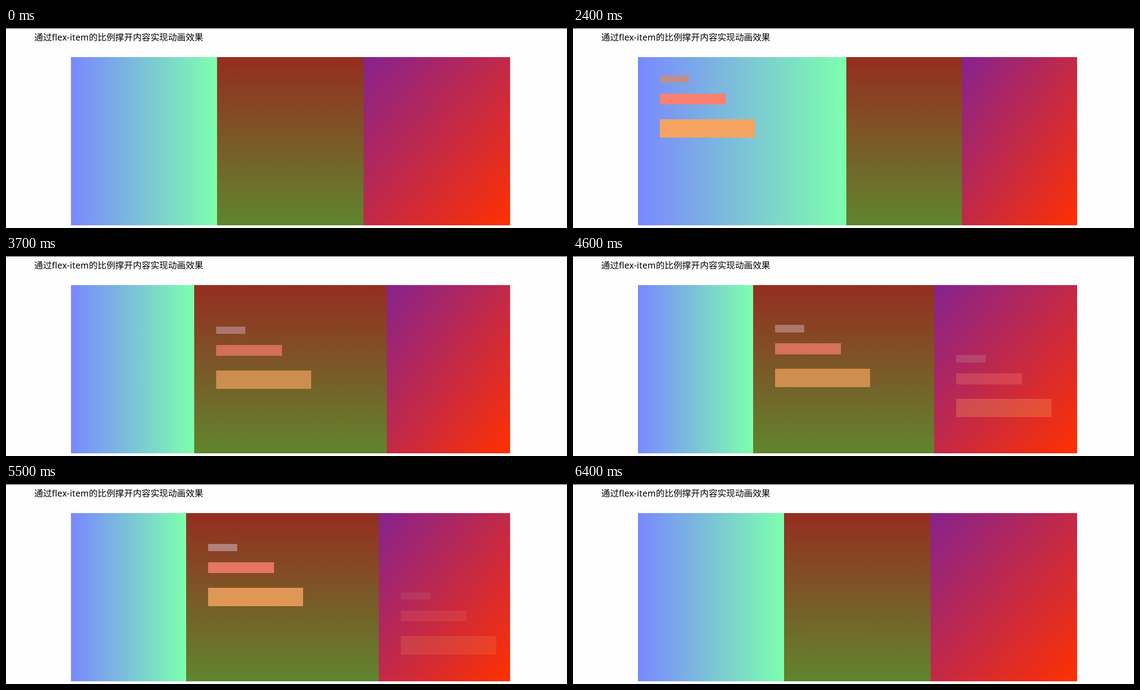
An HTML page for the animation above (7.6 s loop, 1252 by 447 pixels).

```html
<!DOCTYPE html>
<html lang="zh">
<head>
<meta charset="utf-8">
<style>
html, body { margin: 0; width: 100%; height: 100%; overflow: hidden; background: #fefefe; }
body { position: relative; box-sizing: border-box; border-top: 1px solid #000; }
h1 {
  position: absolute; left: 63px; top: 6px; margin: 0; color: #000; white-space: nowrap;
  font: 400 19.65px/28px "Noto Sans", "Noto Sans CJK SC", "Noto Sans CJK", sans-serif;
}
h1 span { letter-spacing: .2px; }
main { position: absolute; left: 144.5px; top: 64px; width: 980.5px; height: 376px; display: flex; }
section { flex: 1 1 0; min-width: 0; padding-left: 49px; overflow: hidden; }
section:nth-child(1) { background: linear-gradient(to right, #7a88ff, #7dffad); }
section:nth-child(2) { background: linear-gradient(to bottom, #952d20, #60852e); }
section:nth-child(3) { background: linear-gradient(to right bottom, #86228f, #ff3000); }
section div { position: relative; }
i { display: block; }
i:nth-child(1) { margin-top: 41px; width: 65.4px; height: 16.4px; background: rosybrown; }
i:nth-child(2) { margin-top: 24.5px; width: 147px; height: 24.5px; background: salmon; }
i:nth-child(3) { margin-top: 32.7px; width: 212.5px; height: 40.9px; background: sandybrown; }
section div { display: flow-root; }
</style>
</head>
<body>
<h1>通过<span>flex-item</span>的比例撑开内容实现动画效果</h1>
<main></main>
<script>
const LOOP = 7600, STEP = 100, DURATION = 500, DROP = 163.5;

// [time, hovered panel]; -1 means none
const hovers = [[1880, 0], [2980, -1], [3500, 1], [4500, 2], [5235, 1], [5930, -1]];

const main = document.querySelector('main');
main.innerHTML = '<section><div><i></i><i></i><i></i></div></section>'.repeat(3);
const panels = [...main.children];

// CSS "ease": cubic-bezier(.25, .1, .25, 1)
function ease(x) {
  if (x <= 0) return 0;
  if (x >= 1) return 1;
  const curve = (s, a, b) => 3 * a * s * (1 - s) ** 2 + 3 * b * s * s * (1 - s) + s ** 3;
  let lo = 0, hi = 1;
  for (let k = 0; k < 24; k++) {
    const mid = (lo + hi) / 2;
    if (curve(mid, .25, .25) < x) lo = mid; else hi = mid;
  }
  return curve(lo, .1, 1);
}

function openness(panel, time) {
  let value = 0;
  hovers.forEach(([start, hovered], k) => {
    const end = Math.min(time, hovers[k + 1]?.[0] ?? LOOP);
    const goal = hovered === panel ? 1 : 0;
    value += (goal - value) * ease((end - start) / DURATION);
  });
  return value;
}

function draw(now) {
  const time = Math.floor(now % LOOP / STEP) * STEP;
  panels.forEach((panel, k) => {
    const open = openness(k, time);
    const bars = panel.firstChild.style;
    panel.style.flexGrow = 1 + open;
    bars.opacity = open;
    bars.top = DROP * (1 - open) + 'px';
  });
}

const begin = performance.now();
function tick() {
  draw(performance.now() - begin);
  requestAnimationFrame(tick);
}
tick();
</script>
</body>
</html>
```
